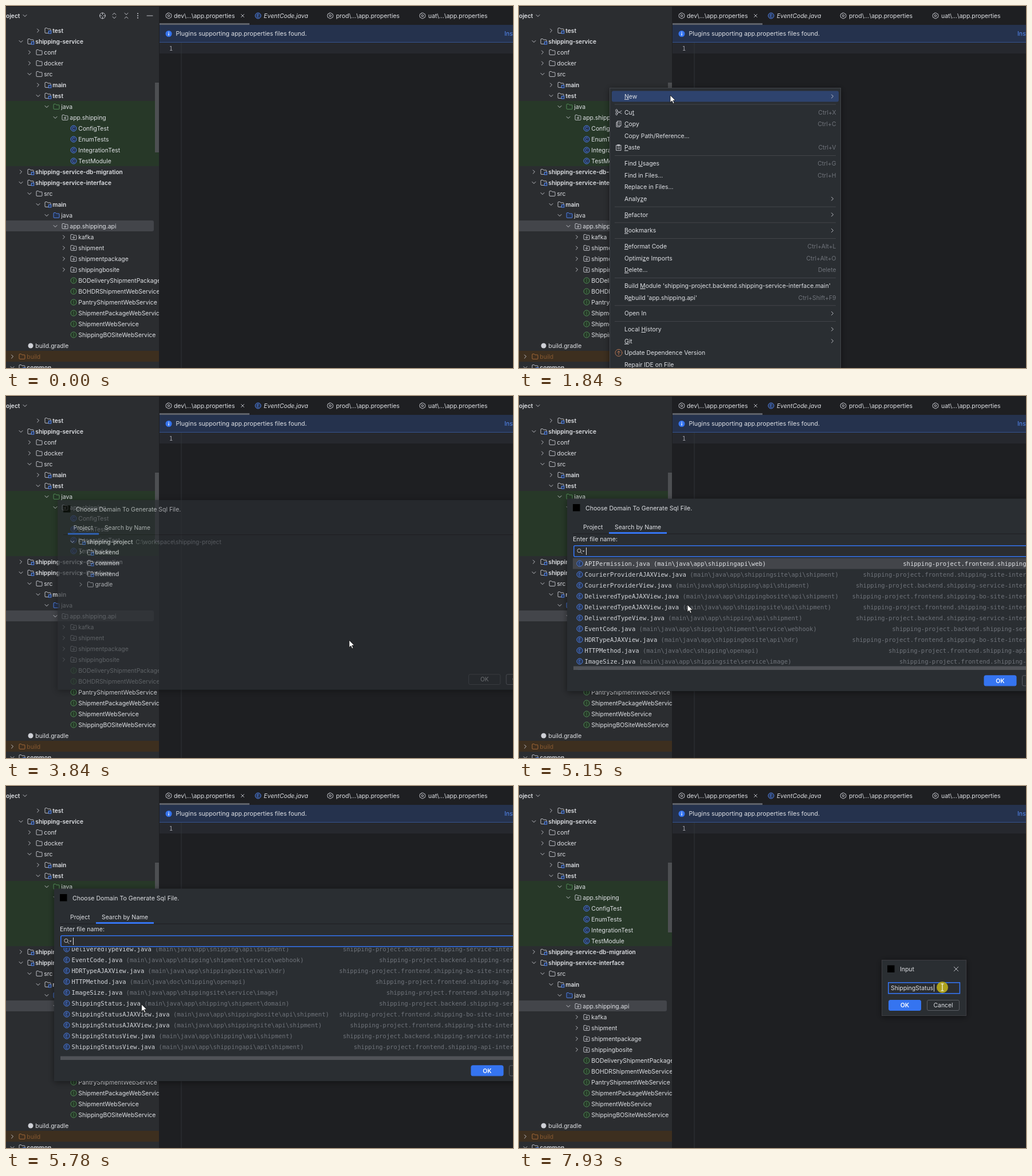
These frames come from a looping animation (885x633 px, 8 s). An HTML page:

```html
<!DOCTYPE html>
<html lang="en">
<head>
<meta charset="utf-8">
<title>IDE walkthrough</title>
<style>
html, body { margin: 0; width: 100%; height: 100%; overflow: hidden; background: #1e1f22; }
svg { display: block; width: 885px; height: 633px; }
text { font: 10.4px Inter, sans-serif; fill: #dfe1e5; white-space: pre; }
.b { font-weight: 600; font-size: 10.2px; }
.i { font-style: italic; }
.big { font-size: 10.6px; }
.mono { font: 10.53px "DejaVu Sans Mono", monospace; fill: #d5d7dc; }
.dim { fill: #6f737a; }
.sel .dim, .sel .mono { fill: #dfe1e5; }
.ln { fill: none; stroke: #ced0d6; stroke-width: .9; stroke-linecap: round; stroke-linejoin: round; }
.u { text-decoration: underline; }
</style>
</head>
<body>
<svg id="stage" viewBox="0 0 885 633">
  <defs>
    <filter id="shadow" x="-20%" y="-20%" width="140%" height="140%">
      <feDropShadow dx="0" dy="2" stdDeviation="6" flood-color="#000" flood-opacity=".45"/>
    </filter>
    <clipPath id="treeClip"><rect width="267" height="633"/></clipPath>
    <clipPath id="listClip"><rect x="94" y="283" width="791" height="196"/></clipPath>
  </defs>
  <g id="base"></g>
  <g id="tools"></g>
  <g id="menu"></g>
  <g id="sub"></g>
  <g id="dialog"></g>
  <g id="input"></g>
  <circle id="click" r="10" fill="#b3a81c" opacity=".95"/>
  <path id="arrow" d="M0 0V12.6L3 9.9 5.1 14.6 7.1 13.7 5 9.1H9Z" fill="#fff" stroke="#111" stroke-width=".8"/>
  <path id="beam" d="M-2.5-6H-.5L0-5.5.5-6H2.5M0-5.5V5.5M-2.5 6H-.5L0 5.5.5 6H2.5" fill="none" stroke="#fff" stroke-width="1.1"/>
</svg>
<script>
const LOOP = 8000;
const $ = id => document.getElementById(id);

// Drawing helpers
const rect = (x, y, w, h, fill, more = '') =>
  `<rect x="${x}" y="${y}" width="${w}" height="${h}" fill="${fill}" ${more}/>`;
const text = (x, y, s, more = '') => `<text x="${x}" y="${y + 3.8}" ${more}>${s}</text>`;
const icon = (x, y, body) => `<g transform="translate(${x} ${y})">${body}</g>`;
const line = (x, y, d, more = '') => icon(x, y, `<path class="ln" d="${d}" ${more}/>`);
const chevron = (x, y, open) =>
  line(x, y, open ? 'M-3-1.5L0 1.5 3-1.5' : 'M-1.5-3L1.5 0-1.5 3');
const cross = (x, y, r) => line(x, y, `M${-r} ${-r}L${r} ${r}M${r} ${-r}L${-r} ${r}`);
const badge = (x, y, ch, stroke, fill) => icon(x, y,
  `<circle r="5" fill="${fill}" stroke="${stroke}" stroke-width=".9"/>
   <text y="2.8" text-anchor="middle" style="font-size:7.5px;fill:${stroke}">${ch}</text>`);
const enumIcon = (x, y) => badge(x, y, 'E', '#548af7', '#25324d');
const gear = (x, y) => line(x, y,
  'M-1.6-4.8H1.6L2.3-3.3 4.2-3.2 5 0 4.2 3.2 2.3 3.3 1.6 4.8H-1.6L-2.3 3.3-4.2 3.2-5 0-4.2-3.2-2.3-3.3ZM1.7 0A1.7 1.7 0 1 1-1.7 0 1.7 1.7 0 1 1 1.7 0');
const button = (x, y, label, primary) =>
  rect(x + .5, y + .5, 56, 18, primary ? '#3574f0' : 'none', `rx="2.5" stroke="${primary ? '#3574f0' : '#5a5d63'}"`) +
  text(x + 28.5, y + 9.5, label, `text-anchor="middle" ${primary ? 'style="font-weight:600;fill:#fff"' : ''}`);

const folder = (x, y, stroke = '#ced0d6', fill = 'none', extra = '') => icon(x, y,
  `<path class="ln" style="stroke:${stroke};fill:${fill}" d="M-5-3.5q0-1 1-1h2.6l1.4 1.5H4q1 0 1 1V3.4q0 1-1 1H-4q-1 0-1-1Z"/>${extra}`);
const icons = {
  f: (x, y) => folder(x, y),
  g: (x, y) => folder(x, y, '#57965c', '#253627'),
  s: (x, y) => folder(x, y, '#548af7', '#25324d'),
  o: (x, y) => folder(x, y, '#b0703a', '#40301f'),
  m: (x, y) => folder(x, y, '#ced0d6', 'none', rect(1.4, .6, 4.4, 4.4, '#25324d', 'stroke="#548af7"')),
  p: (x, y) => folder(x, y, '#ced0d6', 'none', '<circle class="ln" cy=".8" r="1.4"/>'),
  C: (x, y) => badge(x, y, 'C', '#548af7', '#25324d'),
  I: (x, y) => badge(x, y, 'I', '#57965c', '#253627'),
  e: (x, y) => `<circle cx="${x}" cy="${y}" r="4.5" fill="#ced0d6"/>`
};

// state: '+' closed, '-' open, '' leaf
const treeRow = (x, y, state, kind, label, more = '') =>
  (state ? chevron(x, y, state === '-') : '') + icons[kind](x + 17, y) +
  text(x + 25.3, y, label, kind === 'm' ? 'class="b"' : more);

const tree = [
  '3+m test', '1-m shipping-service', '2+f conf', '2+f docker', '2-f src', '3+m main', '3-m test',
  '4-g java', '5-p app.shipping', '6 C ConfigTest', '6 C EnumTests', '6 C IntegrationTest', '6 C TestModule',
  '1+m shipping-service-db-migration', '1-m shipping-service-interface', '2-f src', '3-m main', '4-s java',
  '5-p app.shipping.api', '6+p kafka', '6+p shipment', '6+p shipmentpackage', '6+p shippingbosite',
  '6 I BODeliveryShipmentPackageWebService', '6 I BOHDRShipmentWebService', '6 I PantryShipmentWebService',
  '6 I ShipmentPackageWebService', '6 I ShipmentWebService', '6 I ShippingBOSiteWebService',
  '1 e build.gradle', '0+o build', '0-m common'
].map((row, i) => {
  const [, depth, state, kind, label] = row.match(/^(\d)(.)(.) ?(.*)$/);
  return treeRow(11 + 15 * depth, 43 + 19 * i, state.trim(), kind, label,
    kind === 'o' ? 'style="fill:#85582f"' : '');
}).join('');

$('base').innerHTML =
  rect(0, 0, 267, 633, '#2b2d30') + rect(0, 0, 885, 1, '#1a1b1e') +
  rect(0, 166, 267, 114, '#273828') + rect(0, 603, 267, 19, '#3d2f1f') +
  rect(-5, 375, 263, 19, '#43454a', 'rx="3"') +
  `<g clip-path="url(#treeClip)">${tree}</g>` +
  rect(260, 134, 7, 122, '#4d4f52') +
  rect(0, 1, 267, 32, '#2b2d30') + text(0, 17, 'oject', 'class="b"') + chevron(33, 17, true) +
  rect(268, 30, 157, 3, '#5f6269') +
  gear(284, 17) + text(293, 17, 'dev\\...\\app.properties') + cross(413, 17, 2.5) +
  enumIcon(440, 17) + text(450, 17, 'EventCode.java', 'class="i"') +
  gear(566, 17) + text(576, 17, 'prod\\...\\app.properties') +
  gear(727, 17) + text(737, 17, 'uat\\...\\app.properties') +
  rect(268, 33, 617, 31, '#25324d') + rect(268, 63, 617, 1, '#35538f') +
  '<circle cx="284" cy="48.5" r="5.5" fill="#3574f0"/>' +
  rect(283.4, 47.6, 1.3, 4, '#fff') + rect(283.4, 45.2, 1.3, 1.3, '#fff') +
  text(296.5, 48.5, 'Plugins supporting app.properties files found.', 'class="big"') +
  text(870, 48.5, 'Install', 'style="fill:#548af7"') +
  rect(268, 64, 617, 19, '#26282e') + rect(305.5, 64, 1, 569, '#313438') +
  text(284.7, 74, '1', 'class="mono" style="fill:#a1a3ab"');

$('tools').innerHTML =
  line(168.5, 17, 'M5 0A5 5 0 1 1-5 0 5 5 0 1 1 5 0M0-5V-1.8M0 5V1.8M-5 0H-1.8M5 0H1.8') +
  line(189, 17, 'M-3-1.8L0-4.6 3-1.8M-3 1.8L0 4.6 3 1.8') +
  line(210, 17, 'M-3-4.6L0-1.8 3-4.6M-3 4.6L0 1.8 3 4.6') +
  [-3.8, 0, 3.8].map(d => `<circle cx="230" cy="${17 + d}" r="1" fill="#ced0d6"/>`).join('') +
  line(251, 17, 'M-5 0H5');

// Menus: '&' marks the mnemonic, '|' the shortcut, '>' a submenu, '-' a separator
const glyphs = {
  Cut: (x, y) => line(x, y, 'M-3-2.5L5 2.5M-3 2.5L5-2.5M-2.4-2.8A1.5 1.5 0 1 1-5-2.8 1.5 1.5 0 1 1-2.4-2.8M-2.4 2.8A1.5 1.5 0 1 1-5 2.8 1.5 1.5 0 1 1-2.4 2.8'),
  Copy: (x, y) => line(x, y, 'M-2-5H4V3H-2ZM-2-3H-4V5H2V3M0-2.5H2M0 0H2'),
  Paste: (x, y) => line(x, y, 'M-4-4H4V5H-4ZM-1.8-5H1.8V-3H-1.8ZM-2-.5H2M-2 2H2'),
  Update: (x, y) => line(x, y, 'M6 0A6 6 0 1 1-6 0 6 6 0 1 1 6 0M0 3.2V-3M-2.5-.6L0-3 2.5-.6', 'style="stroke:#c77d55"')
};

function buildMenu(id, left, right, bottom, items) {
  const ys = [];
  let y = 158, body = '', gap = 0;
  for (const item of items) {
    if (item === '-') {
      body += rect(left + 9, y + 13.5, right - left - 18, 1, '#43454a');
      gap = 7.08;
      continue;
    }
    if (ys.length) y += 20.62 + gap;
    gap = 0;
    ys.push(y);
    const [label, keys] = item.replace('>', '').split('|');
    const glyph = glyphs[label.replace('&', '').split(' ')[0]];
    if (glyph && !label.includes('Path')) body += glyph(left + 16, y);
    body += text(left + 26, y, label.replace(/&(.)/, '<tspan class="u">$1</tspan>'));
    if (keys) body += text(right - 8.5, y, keys, 'class="dim" text-anchor="end"');
    if (item.endsWith('>')) body += chevron(right - 15, y, false);
  }
  $(id).innerHTML =
    rect(left + .5, 143.5, right - left - 1, bottom - 144, '#2b2d30', 'stroke="#43454a" filter="url(#shadow)"') +
    rect(left + 4, 0, right - left - 8, 19, '#2e436e', 'rx="3"') + body;
  const bar = $(id).children[1];
  return pointerY => {
    const hit = ys.find(v => Math.abs(v - pointerY) < 10.4);
    bar.setAttribute('y', hit === undefined ? -50 : hit - 9.5);
  };
}

const hoverMenu = buildMenu('menu', 158, 562, 645, [
  '&New>', '-', 'Cu&t|Ctrl+X', '&Copy|Ctrl+C', 'Copy Path/Reference...', '&Paste|Ctrl+V', '-',
  'Find &Usages|Ctrl+G', 'Find in Files...|Ctrl+H', 'Replace in Files...', 'Analy&ze>', '-',
  '&Refactor>', '-', '&Bookmarks>', '-',
  '&Reformat Code|Ctrl+Alt+L', 'Optimi&ze Imports|Ctrl+Alt+O', '&Delete...|Delete', '-',
  "Build &Module 'shipping-project.backend.shipping-service-interface.main'",
  "R&ebuild 'app.shipping.api'|Ctrl+Shift+F9", '-', 'Open In>', '-',
  'Local &History>', '&Git>', 'Update Dependence Version', 'Repair IDE on File'
]);
const hoverSub = buildMenu('sub', 562, 787, 489, [
  'Java Class', 'Kotlin Class/File', 'File', 'Scratch File', '-', 'Package', 'package-info.java', '-',
  'HTML File', 'Stylesheet', '-', 'Kotlin Script', 'Groovy Script', '-',
  'EditorConfig File', 'Resource Bundle', 'Generate Sql File', 'XML File', 'Properties File'
]);

// File chooser
const files = [
  ['APIPermission', 'app/shippingapi/web', 'frontend.shipping-api'],
  ['CourierProviderAJAXView', 'app/shippingsite/api/shipment', 'frontend.shipping-site-interface'],
  ['CourierProviderView', 'app/shipping/api/shipment', 'backend.shipping-service-interface'],
  ['DeliveredTypeAJAXView', 'app/shippingbosite/api/shipment', 'frontend.shipping-bo-site-interface'],
  ['DeliveredTypeAJAXView', 'app/shippingsite/api/shipment', 'frontend.shipping-site-interface'],
  ['DeliveredTypeView', 'app/shipping/api/shipment', 'backend.shipping-service-interface'],
  ['EventCode', 'app/shipping/shipment/service/webhook', 'backend.shipping-service'],
  ['HDRTypeAJAXView', 'app/shippingbosite/api/hdr', 'frontend.shipping-bo-site-interface'],
  ['HTTPMethod', 'doc/shipping/openapi', 'frontend.shipping-api-doc'],
  ['ImageSize', 'app/shippingsite/service/image', 'frontend.shipping-site'],
  ['ShippingStatus', 'app/shipping/shipment/domain', 'backend.shipping-service'],
  ['ShippingStatusAJAXView', 'app/shippingbosite/api/shipment', 'frontend.shipping-bo-site-interface'],
  ['ShippingStatusAJAXView', 'app/shippingsite/api/shipment', 'frontend.shipping-site-interface'],
  ['ShippingStatusView', 'app/shipping/api/shipment', 'backend.shipping-service-interface'],
  ['ShippingStatusView', 'app/shippingapi/api/shipment', 'frontend.shipping-api-interface']
];
const fileRow = ([name, path, module], i) => {
  const y = 293 + 19 * i;
  const dir = `(main/java/${path})`.replaceAll('/', '\\');
  return `<g class="file">${enumIcon(106, y)}` +
    text(114.6, y, `${name}.java <tspan class="dim">${dir}</tspan>`, 'class="mono"') +
    text(910.8, y, `shipping-project.${module}`, 'class="mono dim" text-anchor="end"') + '</g>';
};

$('dialog').innerHTML =
  rect(84, 179.5, 856, 336.5, '#2b2d30', 'filter="url(#shadow)"') +
  rect(94, 189, 12.5, 12.5, '#000') + text(116, 196, 'Choose Domain To Generate Sql File.', 'class="big"') +
  rect(94, 240.5, 840, 1, '#1e1f22') +
  text(112, 229, 'Project') + text(167, 229, 'Search by Name') +
  rect(0, 238, 0, 3, '#3574f0', 'id="tabLine"') +
  `<g id="projectTab">${treeRow(110, 253.4, '-', 'm', 'shipping-project')}` +
  text(222, 253.4, 'C:\\workspace\\shipping-project', 'class="dim"') +
  treeRow(125, 272.3, '+', 'm', 'backend') + treeRow(125, 291.3, '+', 'm', 'common') +
  treeRow(125, 310.3, '+', 'm', 'frontend') + treeRow(125, 329.3, '+', 'f', 'gradle') + '</g>' +
  `<g id="searchTab">${text(94, 250.5, 'Enter file name:', 'class="big"')}` +
  rect(95.8, 261.8, 838, 19, '#2b2d30', 'rx="2" stroke="#3574f0" stroke-width="1.6"') +
  line(106, 271, 'M2.2-.6A3.2 3.2 0 1 1-4.2-.6 3.2 3.2 0 1 1 2.2-.6M1.4 1.8L4.2 4.6') +
  '<path d="M110.5 270.5h4l-2 2.2z" fill="#ced0d6"/>' +
  rect(117, 265, 1, 13, '#dfe1e5', 'id="caret"') +
  `<g id="list"><g clip-path="url(#listClip)"><g id="scroll">${rect(94, 0, 840, 19, '#43454a', 'id="pick"')}
   ${files.map(fileRow).join('')}</g></g>${rect(95, 472.5, 840, 6.5, '#55575b', 'opacity=".9"')}</g></g>` +
  `<g id="okOff" opacity=".55">${button(811.5, 488.3, 'OK')}</g><g id="okOn">${button(811.5, 488.3, 'OK', true)}</g>` +
  button(878, 488.3, 'Cancel');

$('input').innerHTML =
  rect(633.5, 304.5, 147, 97, '#2b2d30', 'stroke="#3c3e43" filter="url(#shadow)"') +
  rect(643, 313.5, 12.5, 12.5, '#000') + text(665, 320, 'Input') + cross(763, 320, 3.7) +
  rect(644.8, 343.8, 124.6, 19, '#2b2d30', 'stroke="#3574f0" stroke-width="1.6"') +
  rect(648.5, 346.5, 75.5, 13.5, '#2e436e', 'id="marked"') + text(649, 353, 'ShippingStatus') +
  rect(724, 346.5, 1, 13, '#dfe1e5', 'id="inputCaret"') +
  button(645, 374, 'OK', true) + button(712, 374, 'Cancel');

// Timeline
const path = [
  [530, 725, 598], [950, 158, 385], [1400, 158, 385], [1820, 264, 156], [2040, 264, 156],
  [2450, 590, 160], [2820, 598, 388], [2890, 598, 388], [3300, 599, 427], [4000, 599, 427],
  [4560, 205, 231], [4720, 205, 231], [5080, 294, 365], [5560, 294, 365], [5930, 205, 391],
  [6000, 205, 391], [6250, 198, 379], [6850, 198, 379], [7400, 745, 389], [7510, 745, 389], [7850, 739, 352]
];
const clicks = [[1220, 1360], [3500, 3640], [4580, 4720], [6340, 6750], [7860, 8000]];

const ramp = (t, a, b) => Math.min(1, Math.max(0, (t - a) / (b - a)));
const smooth = p => p * p * (3 - 2 * p);
const easeOut = p => 1 - (1 - p) ** 3;
const within = (t, a, b) => t >= a && t < b;
const fade = (id, v) => {
  $(id).style.display = v > 0 ? '' : 'none';
  $(id).setAttribute('opacity', v);
};
const show = (id, on) => { $(id).style.display = on ? '' : 'none'; };
const place = (id, x, y) => $(id).setAttribute('transform', `translate(${x} ${y})`);

function pointer(t) {
  let i = path.findIndex(p => p[0] > t);
  if (i < 0) i = path.length;
  const a = path[Math.max(0, i - 1)], b = path[Math.min(i, path.length - 1)];
  const p = smooth(ramp(t, a[0], b[0] + (a === b)));
  return [a[1] + (b[1] - a[1]) * p, a[2] + (b[2] - a[2]) * p];
}

// Window opens and closes with a slight zoom around its centre
function zoom(id, v, cx, cy) {
  const s = .95 + .05 * v;
  fade(id, v);
  $(id).setAttribute('transform', `translate(${cx * (1 - s)} ${cy * (1 - s)}) scale(${s})`);
}

const rows = [...document.querySelectorAll('.file')];

function render(t) {
  const [x, y] = pointer(t);

  fade('tools', t < 500 ? 1 - ramp(t, 60, 200) : within(t, 840, 1290) ? 1 : 0);

  const subOpen = within(t, 2100, 3570);
  fade('menu', t < 3570 ? ramp(t, 1250, 1340) : 0);
  fade('sub', subOpen ? ramp(t, 2080, 2170) : 0);
  hoverMenu(subOpen ? 158 : x > 162 ? y : -50);
  hoverSub(x > 566 ? y : -50);

  zoom('dialog', easeOut(ramp(t, 3770, 3980)) * (1 - ramp(t, 6750, 6910)), 512, 347.5);
  const search = t >= 4650, loaded = t >= 4800;
  $('tabLine').setAttribute('x', search ? 157 : 102);
  $('tabLine').setAttribute('width', search ? 101 : 55);
  show('projectTab', !search);
  show('searchTab', search);
  show('list', loaded);
  show('okOn', loaded);
  show('okOff', !loaded);
  show('caret', (t - 4700) % 1000 < 500);
  place('scroll', 0, -103 * smooth(ramp(t, 5160, 5600)));
  const picked = t < 6350 ? 0 : 10;
  $('pick').setAttribute('y', 283.5 + 19 * picked);
  rows.forEach((r, i) => r.classList.toggle('sel', i === picked));

  zoom('input', easeOut(ramp(t, 7050, 7260)), 707, 353);
  show('marked', t < 7860);
  show('inputCaret', t >= 7860);

  const overField = t > 7200 && within(y, 343, 364) && within(x, 644, 770);
  show('arrow', t >= 530 && !overField);
  show('beam', overField);
  show('click', clicks.some(([a, b]) => within(t, a, b)));
  for (const id of ['arrow', 'beam', 'click']) place(id, x, y);
}

const start = performance.now();
function tick() {
  render((performance.now() - start) % LOOP);
  requestAnimationFrame(tick);
}
tick();
</script>
</body>
</html>
```
